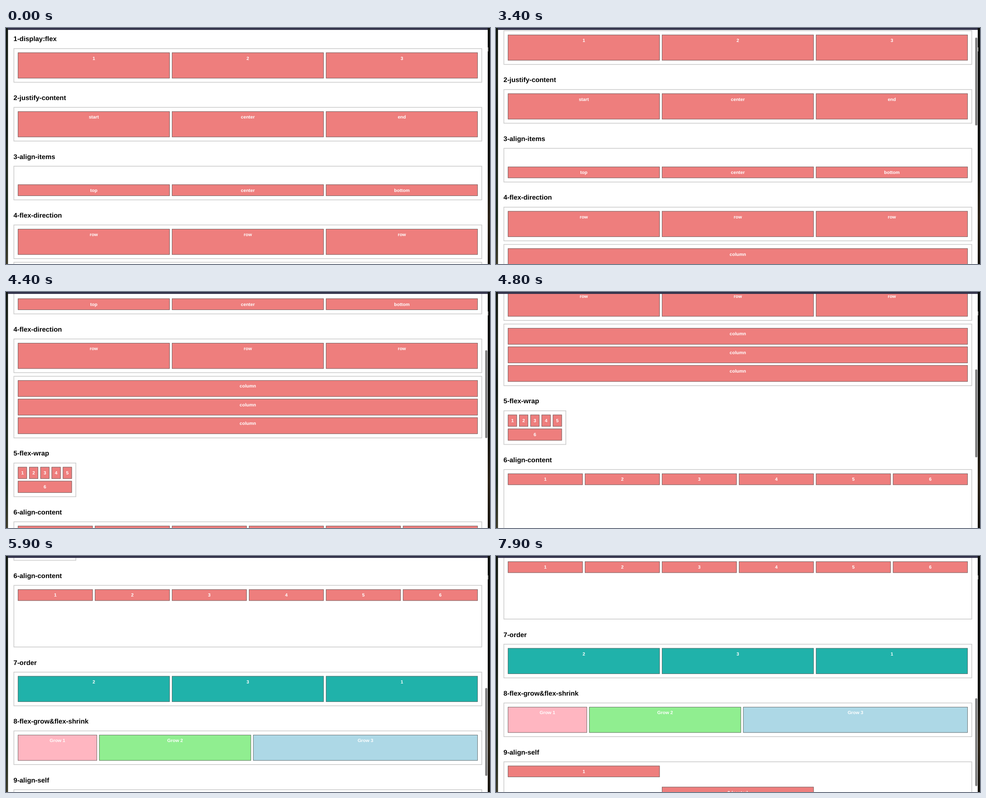
Recreate the animation shown at these times as an HTML page with a canvas. Size 1068 by 524 pixels, loop 8 s.

```html
<!DOCTYPE html>
<html lang="en">
<head>
<meta charset="utf-8">
<title>Flexbox overview</title>
<style>
html, body { margin: 0; width: 100%; height: 100%; overflow: hidden; background: #fff; }
canvas { display: block; width: 1068px; height: 524px; }
</style>
</head>
<body>
<canvas id="stage" width="1068" height="524"></canvas>
<script>
const W = 1068, H = 524, LOOP = 8000, STEP = 100;
const ctx = document.getElementById('stage').getContext('2d');
const FONT = '"Liberation Sans", Arial, sans-serif';

// Page metrics
const LEFT = 16.6, FULL = 1034, PAD = 9.6, GAP = 4.78;
const SHORT = 76.4, TALL = 138.4, HEAD = 54.15, ITEM = 25.3;
const INNER = FULL - 2 * PAD;
const CORAL = '#ee7e7d', TEAL = '#20b2aa';

// Scroll offset over time: [ms, px]
const SCROLL = [
  [0, 0], [2800, 0], [3000, 12], [3300, 12], [3800, 150], [4400, 333],
  [5200, 565], [5900, 778], [6000, 808], [6200, 864], [6500, 918],
  [6900, 918], [7400, 892], [7600, 892], [7900, 840], [8000, 840]
];

function scrollAt(t) {
  const i = SCROLL.findIndex(p => p[0] > t);
  const [t0, y0] = SCROLL[i - 1], [t1, y1] = SCROLL[i];
  return y0 + (y1 - y0) * (t - t0) / (t1 - t0);
}

function frame(x, y, w, h, line, color, fill) {
  ctx.fillStyle = fill;
  ctx.fillRect(x, y, w, h);
  ctx.strokeStyle = color;
  ctx.lineWidth = line;
  ctx.strokeRect(x + line / 2, y + line / 2, w - line, h - line);
}

function item(x, y, w, h, label, fill = CORAL) {
  frame(x, y, w, h, 0.85, '#5c5c5c', fill);
  ctx.font = 'bold 10.19px ' + FONT;
  ctx.textAlign = 'center';
  ctx.fillStyle = '#fff';
  ctx.fillText(label, x + w / 2, y + 16.3);
}

function heading(text, y) {
  ctx.font = 'bold 14.9px ' + FONT;
  ctx.textAlign = 'left';
  ctx.fillStyle = '#000';
  ctx.fillText(text, LEFT, y - 15.5);
}

const box = (y, h, w = FULL) => frame(LEFT, y, w, h, 1.6, '#ccc', '#fff');

// Equal items side by side; inner is the room they share
function row(y, h, labels, fill = CORAL, inner = INNER) {
  const w = (inner - GAP * (labels.length - 1)) / labels.length;
  labels.forEach((s, i) => item(LEFT + PAD + i * (w + GAP), y, w, h, s, fill));
}

function page() {
  const tallItem = SHORT - 2 * PAD;
  let y = 44.9;
  const next = h => { y += h + HEAD; };

  heading('1-display:flex', y);
  box(y, SHORT);
  row(y + PAD, tallItem, ['1', '2', '3']);
  next(SHORT);

  heading('2-justify-content', y);
  box(y, SHORT);
  row(y + PAD, tallItem, ['start', 'center', 'end']);
  next(SHORT);

  heading('3-align-items', y);
  box(y, SHORT);
  row(y + SHORT - PAD - ITEM, ITEM, ['top', 'center', 'bottom']);
  next(SHORT);

  heading('4-flex-direction', y);
  box(y, SHORT);
  row(y + PAD, tallItem, ['row', 'row', 'row']);
  y += SHORT + 6.4;
  box(y, TALL);
  const colH = (TALL - 2 * PAD - 2 * GAP) / 3;
  for (let i = 0; i < 3; i++) row(y + PAD + i * (colH + GAP), colH, ['column']);
  next(TALL);

  heading('5-flex-wrap', y);
  box(y, SHORT, TALL);
  const wrapH = (tallItem - GAP) / 2, wrapW = TALL - 2 * PAD;
  row(y + PAD, wrapH, ['1', '2', '3', '4', '5'], CORAL, wrapW);
  row(y + PAD + wrapH + GAP, wrapH, ['6'], CORAL, wrapW);
  next(SHORT);

  heading('6-align-content', y);
  box(y, TALL);
  row(y + PAD, ITEM, ['1', '2', '3', '4', '5', '6']);
  next(TALL);

  heading('7-order', y);
  box(y, SHORT);
  row(y + PAD, tallItem, ['2', '3', '1'], TEAL);
  next(SHORT);

  heading('8-flex-grow&flex-shrink', y);
  box(y, SHORT);
  let x = LEFT + PAD;
  [[174.6, '#ffb6c1'], [335, '#90ee90'], [495.6, '#add8e6']].forEach(([w, fill], i) => {
    item(x, y + PAD, w, tallItem, 'Grow ' + (i + 1), fill);
    x += w + GAP;
  });
  next(SHORT);

  heading('9-align-self', y);
  box(y, TALL);
  const w = (INNER - 2 * GAP) / 3, room = TALL - 2 * PAD - ITEM;
  ['1', '2 (center)', '3 (end)'].forEach((s, i) =>
    item(LEFT + PAD + i * (w + GAP), y + PAD + room * i / 2, w, ITEM, s));
}

function strip(x, w, colors) {
  const g = ctx.createLinearGradient(0, 0, 0, H);
  colors.forEach((c, i) => g.addColorStop(i / (colors.length - 1), c));
  ctx.fillStyle = g;
  ctx.fillRect(x, 0, w, H);
}

function desktop() {
  strip(0, 4.4, ['#10170f', '#182016', '#0c140e', '#1a2418', '#142416', '#3a3826']);
  strip(1063, 5, ['#0e100e', '#0b0c0b', '#0d0e0c', '#10100c', '#2a2115', '#15120d']);
  ctx.fillStyle = '#8b8b88';
  ctx.fillRect(1063, 43, 1.4, 9);
  ctx.fillStyle = '#33334b';
  ctx.fillRect(4, 0, 1059, 4.2);
}

function scrollbar(offset) {
  ctx.fillStyle = '#7c7c7c';
  ctx.beginPath();
  ctx.roundRect(1057.4, 6.6 + offset * 0.368, 4.7, 195.4, 2.35);
  ctx.fill();
}

function draw(now) {
  const t = Math.floor(now % LOOP / STEP) * STEP;
  const offset = scrollAt(t);
  ctx.fillStyle = '#fff';
  ctx.fillRect(0, 0, W, H);
  ctx.save();
  ctx.textRendering = 'geometricPrecision';
  ctx.translate(0, -offset);
  page();
  ctx.restore();
  if (offset > 0) scrollbar(offset);
  desktop();
}

const start = performance.now();
function tick() {
  draw(performance.now() - start);
  requestAnimationFrame(tick);
}
tick();
</script>
</body>
</html>
```
